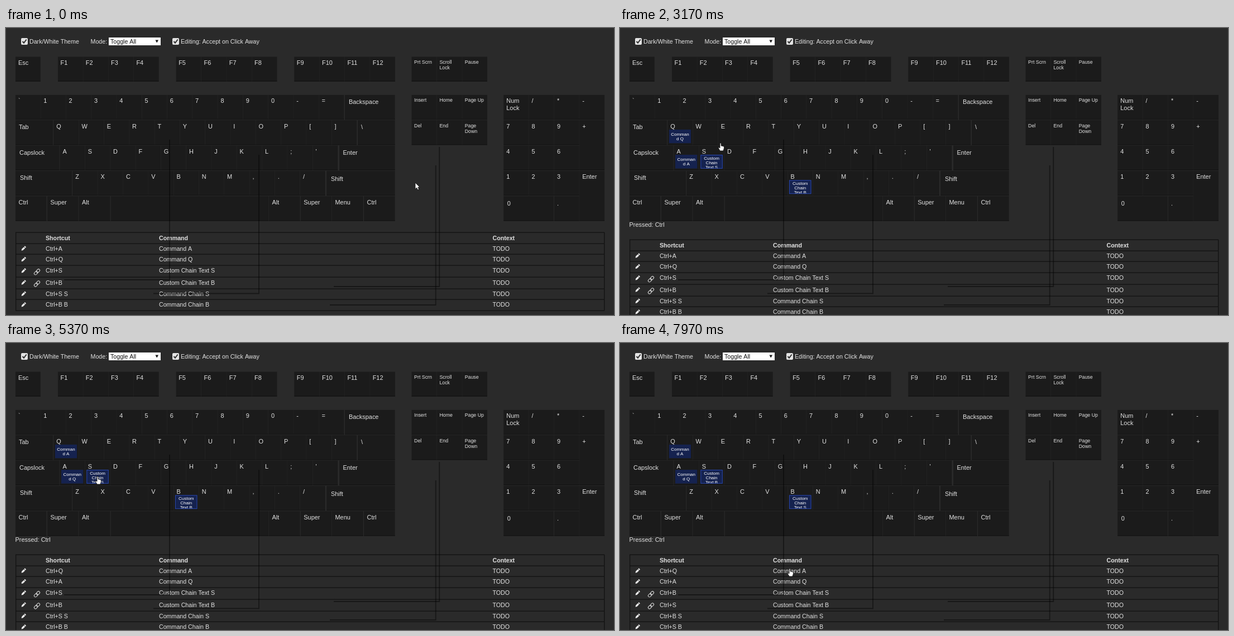
Animation, 1089 px wide and 514 px high, one loop 8000 ms. Source, as an HTML page with a canvas:

```html
<!DOCTYPE html>
<html lang="en">
<head>
<meta charset="utf-8">
<style>
  html, body { margin: 0; width: 100%; height: 100%; overflow: hidden; background: #fff; }
  canvas { display: block; }
</style>
</head>
<body>
<canvas id="stage" width="1089" height="514"></canvas>
<script>
const ctx = document.getElementById("stage").getContext("2d");
const LOOP = 8000, PITCH = 45.3, W = 1089, H = 514;
const INK = "#e2e2e2", PAGE = "#2a2a2a", LINE = "#121212";
const BLUE = "#15224f", BLUE_EDGE = "#2745ad";

// Keyboard
const keys = [];
const byName = {};
function key(x, y, w, text, opt = {}) {
  const k = { x, y, w, h: 44.2, text, dx: 5, dy: 10.5, size: 10.93, ...opt };
  keys.push(k);
  byName[text] ??= k;
  return k;
}
function run(x, y, names, opt) {
  names.split(" ").forEach((n, i) => key(x + i * PITCH, y, 44.2, n.replace("_", "\n"), opt));
}
const ROW = [51.5, 119.8, 165.1, 210.4, 255.8, 301.2];
const small = { size: 8.8, dx: 4.5, dy: 9.5, lead: 10 };
const wide = (dx) => ({ dx, dy: 12.5 });

run(17, ROW[0], "Esc");
run(93, ROW[0], "F1 F2 F3 F4", { dx: 4.5 });
run(304.7, ROW[0], "F5 F6 F7 F8", { dx: 4.5 });
run(516.3, ROW[0], "F9 F10 F11 F12", { dx: 4.5 });
run(17, ROW[1], "` 1 2 3 4 5 6 7 8 9 0 - =");
key(607, ROW[1], 89, "Backspace", wide(7));
key(17, ROW[2], 66.5, "Tab", { dx: 6, dy: 11.5 });
run(85.2, ROW[2], "Q W E R T Y U I O P [ ]");
key(630, ROW[2], 66, "\\", { dx: 6, dy: 11.5 });
key(17, ROW[3], 78, "Capslock", wide(7));
run(96.5, ROW[3], "A S D F G H J K L ; '");
key(597, ROW[3], 99, "Enter", wide(6.5));
key(17, ROW[4], 100.5, "Shift", wide(8));
run(119.3, ROW[4], "Z X C V B N M , . /");
key(574, ROW[4], 122, "Shift", { dx: 8, dy: 14 });
const modifier = (x, w, n) => key(x, ROW[5], w, n, { dx: 5.5 });
const ctrlKeys = [modifier(17, 55, "Ctrl"), modifier(641, 55, "Ctrl")];
modifier(74, 55, "Super");
modifier(130.5, 55.5, "Alt");
modifier(187.8, 282, "");
modifier(471, 55, "Alt");
modifier(527.8, 55, "Super");
modifier(584, 55.3, "Menu");
key(726.6, ROW[0], 44.2, "Prt Scrn", small);
key(771.9, ROW[0], 44.2, "Scroll\nLock", small);
key(817.2, ROW[0], 44.2, "Pause", small);
key(726.6, ROW[1], 44.2, "Insert", small);
key(771.9, ROW[1], 44.2, "Home", small);
key(817.2, ROW[1], 44.2, "Page Up", small);
run(726.6, ROW[2], "Del End Page_Down", small);
run(891.3, ROW[1], "Num_Lock / * -", { lead: 13 });
run(891.3, ROW[2], "7 8 9");
key(1027.2, ROW[2], 44.2, "+", { h: 89.5 });
run(891.3, ROW[3], "4 5 6");
run(891.3, ROW[4], "1 2 3");
key(1027.2, ROW[4], 44.2, "Enter", { h: 89.5 });
key(891.3, ROW[5], 89, "0", wide(6.5));
key(981.9, ROW[5], 44.2, ".", { dx: 5, dy: 12.5 });

// Timeline
const commands = ["Command A", "Command Q", "Custom Chain Text S", "Custom Chain Text B",
  "Command Chain S", "Command Chain B"];
const bindings = [
  [0, "A,Q,S,B,S S,B B"],
  [4370, "Q,A,S,B,S S,B B"],
  [6570, "Q,A,B,S,B S,S B"],
];
// time, x, y, dragged command, hovered key
const pointer = [
  [0, 733, 277], [490, 729, 275], [2970, 430, 240], [3170, 180, 206], [3370, 108, 190],
  [3570, 113, 198, 1, "Q"], [3770, 132, 217, 1, "A"], [3970, 147, 233, 1, "S"],
  [4170, 128, 235, 1, "A"], [4370, 117, 234], [5170, 146, 236], [5370, 164, 239],
  [5570, 173, 241, 2, "S"], [5770, 194, 244, 2, "D"], [5970, 222, 247, 2, "D"],
  [6170, 250, 250, 2, "F"], [6370, 304, 272, 2, "B"], [6570, 318, 280],
  [6970, 262, 296], [7170, 190, 315], [7370, 133, 329], [7570, 190, 352],
  [7770, 255, 382], [7970, 304, 404],
];
const statuses = [
  [0, ""], [490, "Pressed: Ctrl"], [980, "Waiting on chain: Ctrl+S"],
  [1490, "Waiting on chain: Ctrl+S Ctrl"], [1990, "No chained shortcut Ctrl+S Ctrl+A"],
  [2470, "Pressed: Ctrl"],
];
const at = (track, t) => track.findLast((k) => k[0] <= t);
const within = (t, a, b) => t >= a && t < b;

// Drawing helpers
function rect(x, y, w, h, fill) {
  ctx.fillStyle = fill;
  ctx.fillRect(x, y, w, h);
}
function frame(x, y, w, h, color, width = 1) {
  ctx.strokeStyle = color;
  ctx.lineWidth = width;
  ctx.strokeRect(x, y, w, h);
}
function poly(points, fill, stroke, width = 1) {
  ctx.beginPath();
  points.forEach(([x, y]) => ctx.lineTo(x, y));
  if (fill) { ctx.closePath(); ctx.fillStyle = fill; ctx.fill(); }
  if (stroke) { ctx.strokeStyle = stroke; ctx.lineWidth = width; ctx.stroke(); }
}
// y is the middle of the capitals
function text(s, x, y, size = 10.67, color = INK, weight = "", align = "left") {
  ctx.font = `${weight} ${size}px "Liberation Sans", Arial, sans-serif`;
  ctx.fillStyle = color;
  ctx.textAlign = align;
  ctx.fillText(s, x, y + size * 0.36);
}

function drawToolbar() {
  for (const x of [27, 298]) {
    ctx.beginPath();
    ctx.roundRect(x, 18, 12, 12, 2);
    ctx.fillStyle = "#e4e4e4";
    ctx.fill();
    poly([[x + 2.5, 24], [x + 5, 26.7], [x + 9.7, 20.5]], null, "#333", 2);
  }
  text("Dark/White Theme", 42, 24);
  text("Mode:", 151.5, 24);
  rect(184, 17, 93, 14, "#fff");
  text("Toggle All", 187, 24, 10.67, "#111");
  poly([[267.5, 21.5], [273, 21.5], [270.2, 26.5]], "#111");
  text("Editing: Accept on Click Away", 313, 24);
}

function drawKey(k, bold) {
  if (bold) {
    rect(k.x, k.y, k.w, k.h, "#131313");
    rect(k.x + 2, k.y + 2, k.w - 4, k.h - 4, "#1d1d1d");
  } else {
    rect(k.x, k.y, k.w + 0.6, k.h, "#1b1b1b");
    rect(k.x, k.y + k.h - 1.2, k.w + 0.6, 1.4, "#151515");
  }
  k.text.split("\n").forEach((s, i) =>
    text(s, k.x + k.dx, k.y + k.dy + i * (k.lead || 0), k.size));
}

function drawDotted(k) {
  ctx.setLineDash([2, 2]);
  frame(k.x + 1, k.y + 1, k.w - 2, k.h - 2, "#2c4ad0", 1.8);
  ctx.setLineDash([]);
}

function wrap(label) {
  return label.startsWith("Custom")
    ? ["Custom", "Chain", label.slice(-6)]
    : ["Comman", label.slice(6)];
}

function drawLabel(name, label, taken) {
  const k = byName[name], x = k.x + 2.5, y = k.y + 16.6, w = 39.5, h = 24.8;
  const lines = wrap(label);
  ctx.save();
  ctx.beginPath();
  ctx.rect(x, y, w, h);
  ctx.clip();
  rect(x, y, w, h, taken ? "#860a20" : BLUE);
  const top = k.y + (lines.length > 2 ? 22.3 : 25);
  lines.forEach((s, i) =>
    text(s, x + w / 2, top + i * 8, 8, taken ? "#e02034" : "#fff", "", "center"));
  ctx.restore();
  if (lines.length > 2) frame(x + 0.5, y + 0.5, w - 1, h - 1, taken ? "#a01028" : BLUE_EDGE);
}

function drawGhost(i, x, y) {
  const label = commands[i], chain = i > 1;
  ctx.font = 'bold 11px "Liberation Sans", Arial, sans-serif';
  const w = ctx.measureText(label).width + 11;
  const left = x - (chain ? 26 : 10), top = y - 10;
  ctx.globalAlpha = 0.58;
  rect(left, top, w, 26, "#1a2b68");
  if (chain) frame(left + 0.5, top + 0.5, w - 1, 25, BLUE_EDGE);
  text(label, left + w / 2, top + 13, 11, "#eee", "bold", "center");
  ctx.globalAlpha = 1;
}

function drawPencil(x, y) {
  ctx.save();
  ctx.translate(x, y);
  ctx.rotate(-Math.PI / 4);
  poly([[-5.5, 0], [-3, -1.6], [2.2, -1.6], [2.2, 1.6], [-3, 1.6]], "#eee");
  rect(2.9, -1.6, 2, 3.2, "#eee");
  ctx.restore();
}

function drawChain(x, y) {
  ctx.save();
  ctx.translate(x, y);
  ctx.rotate(-Math.PI / 4);
  ctx.strokeStyle = "#ddd";
  ctx.lineWidth = 1;
  for (const dx of [-6.2, -0.8]) {
    ctx.beginPath();
    ctx.roundRect(dx, -2.3, 7, 4.6, 2.3);
    ctx.stroke();
  }
  ctx.restore();
}

function drawTable(top, rows, lit) {
  const head = 19.6;
  text("Shortcut", 71, top + 9.7, 10.67, INK, "bold");
  text("Command", 274, top + 9.7, 10.67, INK, "bold");
  text("Context", 871.5, top + 9.7, 10.67, INK, "bold");
  const lines = [top, top + head];
  let y = top + head;
  for (const { i, keysText } of rows) {
    const chain = i === 2 || i === 3, h = chain ? 21.1 : 19.5, mid = y + h / 2 - 0.5;
    if (lit(i)) rect(17, y, 1055, h, "#28386d");
    drawPencil(31.5, mid);
    if (chain) drawChain(55.5, mid + 2.2);
    text(keysText, 71, mid);
    text(commands[i], 274, mid);
    text("TODO", 871.5, mid);
    lines.push(y += h);
  }
  for (const line of lines) rect(17, Math.round(line) - 0.5, 1055, 1.3, LINE);
  for (const x of [17, 1071]) rect(x, top, 1.3, y - top, LINE);
  return y;
}

function drawConnectors() {
  const path = (x, y1, y2, x2) =>
    poly([[x, y1], [x, y2], [x2, y2]], null, "rgba(0,0,0,.45)", 1.8);
  path(293, 200, 451, 104);
  path(453, 227, 475.5, 264);
  path(776.3, 213, 463, 587);
  path(769.7, 246, 496, 580);
}

function drawArrow(x, y) {
  poly([[x, y], [x, y + 11.5], [x + 2.6, y + 9], [x + 4.6, y + 13], [x + 6.6, y + 12],
    [x + 4.8, y + 8.2], [x + 8, y + 8]], "#fff", "#111", 0.8);
}

function drawHand(x, y) {
  ctx.lineJoin = "round";
  poly([[x - 1, y], [x + 1, y], [x + 1.2, y + 5], [x + 6, y + 6], [x + 6.5, y + 8],
    [x + 6, y + 11], [x + 4.8, y + 14], [x - 0.8, y + 14], [x - 3.8, y + 9],
    [x - 3.6, y + 7.6], [x - 1, y + 9]], "#fff", "#111", 0.8);
  ctx.lineJoin = "miter";
}

function render(t) {
  const [, px, py, dragged = -1, over] = at(pointer, t);
  const status = at(statuses, t)[1];
  const bound = at(bindings, t)[1].split(",");
  const chaining = within(t, 980, 1990);
  const pressed = status.startsWith("Pressed");
  const lit = (i) => within(t, 4370, 4770) ? i < 2 : within(t, 6570, 6970) && i > 1;

  rect(0, 0, W, H, PAGE);
  drawToolbar();
  const bold = within(t, 980, 2470);
  keys.forEach((k) => drawKey(k, bold));

  if (pressed) {
    const owners = bound.slice(0, 4);
    owners.forEach((name, i) => {
      if (i !== dragged) drawLabel(name, commands[i], name === over);
    });
    const free = owners.every((name, i) => name !== over || i === dragged);
    if (dragged >= 0 && free) drawLabel(over, commands[dragged]);
  }
  if (chaining) {
    if (t < 1490) drawLabel("S", commands[4]);
    [byName.S, ...ctrlKeys].forEach(drawDotted);
  }
  if (status) text(status, 16.5, 352, 10.93);

  let rows = bound.map((b, i) => ({ i, keysText: "Ctrl+" + b }));
  if (chaining) rows = t < 1490 ? [rows[4]] : [];
  const end = drawTable(status ? 379 : 366, rows, lit) + 20;
  if (end < H) {
    rect(0, end - 2, W, 2, "#1d1d1d");
    rect(0, end, W, H - end, "#fff");
  }
  drawConnectors();
  if (dragged >= 0) drawGhost(dragged, px, py);
  (t < 3170 ? drawArrow : drawHand)(px, py);
}

function tick(now) {
  render(now % LOOP);
  requestAnimationFrame(tick);
}
render(0);
requestAnimationFrame(tick);
</script>
</body>
</html>
```
